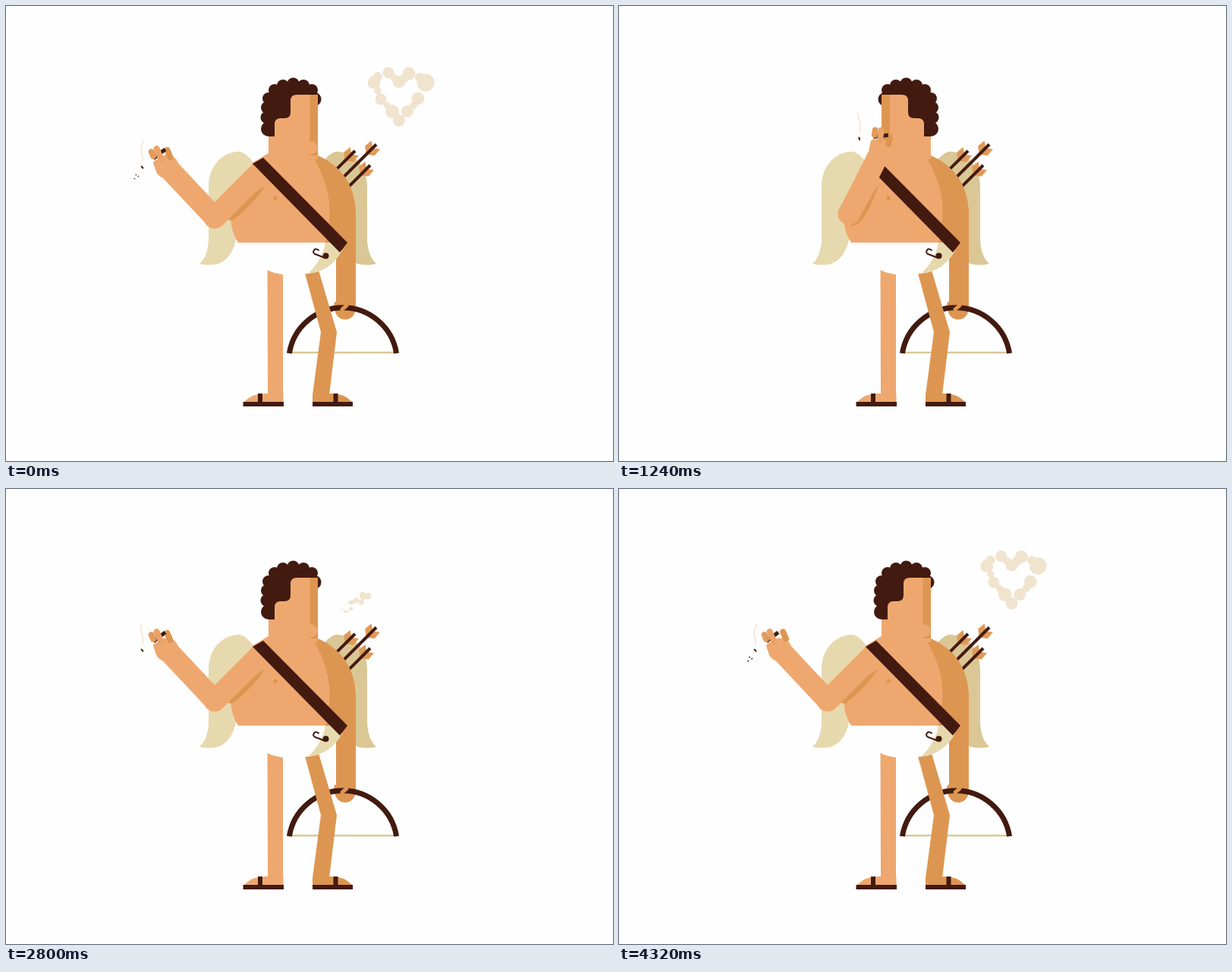
An HTML page with a canvas for the animation above (4360 ms loop, 800 by 600 pixels).

```html
<!DOCTYPE html>
<html lang="en">
<head>
<meta charset="utf-8">
<title>Cupid on a break</title>
<style>
html, body { margin: 0; width: 100%; height: 100%; overflow: hidden; background: #fefefe; }
canvas { display: block; }
</style>
</head>
<body>
<canvas id="stage" width="800" height="600"></canvas>
<script>
const c = document.getElementById('stage').getContext('2d');
const LOOP = 4360;
const SKIN = '#eea86f', SHADE = '#dd9651', DARK = '#431a10', WHITE = '#fefefe';
const WING = '#e7d9ae', WING_DARK = '#dac795', SMOKE = '#f0e4cf';

const clamp = v => Math.max(0, Math.min(1, v));
const lerp = (a, b, k) => a + (b - a) * k;
const span = (t, a, b) => clamp((t - a) / (b - a));
const smooth = k => k * k * (3 - 2 * k);
const easeIn = k => k * k;
const easeOut = k => 1 - (1 - k) * (1 - k);

function fill(d, color) {
  c.fillStyle = color;
  c.fill(new Path2D(d));
}
function line(d, color, width, cap = 'butt') {
  c.strokeStyle = color;
  c.lineWidth = width;
  c.lineCap = c.lineJoin = cap === 'round' ? 'round' : 'miter';
  if (cap !== 'round') c.lineCap = 'butt';
  c.stroke(new Path2D(d));
}
function dot(x, y, r, color) {
  if (r <= 0) return;
  c.fillStyle = color;
  c.beginPath();
  c.arc(x, y, r, 0, 7);
  c.fill();
}
function group(x, y, draw) {
  c.save();
  c.translate(x, y);
  draw();
  c.restore();
}

// Arm poses: elbow x, elbow y, forearm angle, forearm length, wrist turn
const OUT = [275, 279, -133.2, 92, -23];
const UP = [291, 277, -90.7, 87, 0];
const MOUTH = [303, 274, -63.2, 93, 8];
const BACK = [294, 275, -78.2, 88, 0];
const armKeys = [
  [40, 280, OUT, UP, easeIn],
  [280, 520, UP, MOUTH, easeOut],
  [1800, 2260, MOUTH, BACK, smooth],
  [2260, 2700, BACK, OUT, smooth]
];
function armPose(t) {
  let pose = OUT;
  for (const [a, b, from, to, ease] of armKeys)
    if (t >= a) pose = from.map((v, i) => lerp(v, to[i], ease(span(t, a, b))));
  const [ex, ey, deg, len, turn] = pose, a = deg * Math.PI / 180;
  return { ex, ey, hx: ex + len * Math.cos(a), hy: ey + len * Math.sin(a), turn: turn * Math.PI / 180 };
}

// 1 faces right, 0 front, -1 left
const headTurn = t => 1 - 2 * smooth(span(t, 40, 380)) + 2 * smooth(span(t, 2040, 2520));
const sag = t => easeOut(span(t, 40, 320)) - smooth(span(t, 560, 1080));

function wings() {
  const d = 'M308 192C284 192 267 212 267 238V308Q266 330 255 340Q294 349 303 308L330 300V212Q318 194 308 192Z';
  fill(d, WING);
  c.save();
  c.translate(743, 0);
  c.scale(-1, 1);
  fill(d, WING_DARK);
  c.restore();
}

function arrow(x, y, len) {
  group(x, y, () => {
    c.rotate(-Math.PI / 4);
    for (const s of [1, -1]) fill(`M-18 ${s}L-12 ${9 * s}L-1 ${8 * s}L-6 ${s}Z`, '#e09a58');
    line(`M0 0H${-len}`, DARK, 4);
  });
}

function body(b) {
  fill(`M403 196L411 197Q458 218 461 270V${400 + 4.5 * b}H435V325L415 ${312 + b}Z`, SHADE);
  fill(`M346 194L326 206Q297 245 296 279Q297 299 306 ${312 + b}H421Q425 300 426 280Q430 240 403 196Z`, SKIN);
  dot(355, 253.5 + b, 2.8, SHADE);
}

function bow() {
  dot(447, 400, 13.5, SHADE);
  dot(437, 394, 5, SHADE);
  line('M377 457H512', WING_DARK, 2.5);
  line('M373.4 458A71.5 71.5 0 0 1 514.6 458', DARK, 7);
  line('M449 395L443 400', SHADE, 5, 'round');
}

function legs(b) {
  const kx = 2.5 * b, ky = 430 - 2 * b;
  fill(`M392 345H411L${436 + kx} ${ky}L426 513H404L${415 + kx} ${ky}Z`, SHADE);
  fill('M344.5 340H365V514H345Z', SKIN);
  fill('M314 522Q324 511 341 511H365.5V522Z', SKIN);
  fill('M456 522Q446 511 429 511H404V522Z', SHADE);
  c.fillStyle = DARK;
  c.fillRect(312.5, 522, 53.5, 6);
  c.fillRect(404, 522, 53, 6);
  c.fillRect(332, 511, 6, 12);
  c.fillRect(431.5, 511, 6, 12);
}

function diaper() {
  const hem = 'Q428 350 443 322L437 312';
  fill(`M303 312Q315 342 344 348Q356 354 370 354L398 353${hem}Z`, WHITE);
  fill(`M421 312Q417 335 398 353${hem}Z`, WING);
  line('M412 322Q407 318 405 324Q405 326 407 327L420 332', DARK, 2, 'round');
  dot(421.5, 329.5, 4, DARK);
}

const curls = [[346, 162, 10], [343.5, 147, 8], [344, 134, 8], [346, 122, 8], [354, 111, 8], [365, 105, 8]];
function hair(h) {
  const side = s => curls.map(([x, y, r]) => {
    const u = Math.max(0, s * h) ** 2;
    if (y > 115) x += 6 * u;
    if (y > 123) y = lerp(y, 123, u);
    return [s < 0 ? x : 757 - x, y, r];
  });
  const left = side(-1), right = side(1);
  const all = [...left, [378.5, 102.5, 8], ...right.reverse()];
  all.forEach(p => dot(...p, DARK));
  fill('M' + all.map(p => p[0] + ' ' + p[1]).join('L') + 'Z', DARK);
  c.fillRect(346, 118, 65, 54);
}

function head(h) {
  const l = 354 + (h > 0 ? 21 : 16) * h, r = 403 + (h > 0 ? 16 : 22) * h;
  hair(h);
  c.save();
  c.beginPath();
  c.rect(346, 110, 65, 92);
  c.clip();
  const face = new Path2D(`M346 202V172H${l - 21}V156q0-8 8-8H${l - 8}q8 0 8-8V125q0-8 8-8` +
    `H${r - 8}q8 0 8 8V140q0 8 8 8H${r + 13}q8 0 8 8V172H411V202Z`);
  c.clip(face);
  c.fillStyle = SKIN;
  c.fillRect(300, 100, 150, 110);
  c.fillStyle = SHADE;
  if (h > -.1) c.fillRect(400.5, 110, 11, 87);
  else c.fillRect(346, 110, 11, 74);
  dot(380 + 22 * Math.max(-1, Math.min(1, h * 1.6)), 187, 8.5, SKIN);
  c.restore();
}

function upperArm({ ex, ey }) {
  const k = (ex - 275) / 28;
  fill(`M342 237Q323 ${265 + 26 * k} ${298 + 8 * k} ${283 + 7 * clamp(k * 1.6)}L${ex} ${ey}Z`, SHADE);
  line(`M332 222L${ex} ${ey}`, SKIN, 29, 'round');
}

function hand(t) {
  fill('M-15 4V-9Q-15 -14 -10 -14H2V10Z', SKIN);
  dot(0, 0, 15.5, SKIN);
  const flick = span(t, 4200, 4300) * 4;
  line(`M${9 + flick} -20V-10`, SHADE, 8, 'round');
  line('M-12 -18L-30 -12', WHITE, 3);
  line('M-12 -17L7 -22', DARK, 5);
  line('M-31 -14L-29.5 -10', DARK, 2);
  line('M-11 -26V-20', '#e29b5b', 8, 'round');
  line('M-3 -27V-12', '#e9a267', 8, 'round');
}

function wisp(x, y, t) {
  let d = '';
  for (let i = 8; i <= 34; i += 2)
    d += (d ? 'L' : 'M') + (x + Math.sin(i * .2 - t * Math.PI * 16 / LOOP) * i / 14) + ' ' + (y - i);
  line(d, '#efe4d2', 1.5, 'round');
}

// Fully grown smoke heart: x, y, radius, in the order the puffs leave the mouth
const puffs = [
  [553, 101, 11.5], [531, 89, 8.5], [545, 94, 6], [543, 122, 8.5], [518, 100, 8],
  [525, 95, 6], [512, 95, 5], [504, 88, 7.5], [529, 139, 8], [537, 131, 5],
  [518, 151, 8], [509, 139, 9], [490, 93, 6], [494, 123, 7.5], [485, 101, 8.5],
  [490, 112, 4.5], [502, 131, 4.5]
];
function smoke(t) {
  const late = t < 1200, now = late ? t + LOOP : t;
  if (!late && t < 2520) return;
  const p = (now - 3480) / 880, grown = clamp(p);
  puffs.forEach(([x, y, size], i) => {
    const tx = lerp(508 + (x - 518) * .8, x, p), ty = lerp(150 + (y - 151) * .8, y, p);
    const e = 1 - (1 - span(now, 2520 + i * 11, 3120 + i * 11)) ** 1.5, q = 1 - e;
    const r = lerp(7.5, size, grown) * clamp(e * 1.6 - .4) - Math.max(0, now - LOOP) / 95;
    dot(q * q * 412 + 2 * q * e * 462 + e * e * tx, q * q * 188 + 2 * q * e * 145 + e * e * ty, r, SMOKE);
  });
}

function ash(t) {
  const age = (t + LOOP - 4280) % LOOP;
  if (age > 400) return;
  for (const [x, y] of [[173, 221], [171, 226], [176, 223]])
    dot(x - age * .02, y + age * .02, 1.1 * (1 - age / 500), '#443b38');
}

function render(t) {
  const b = sag(t), arm = armPose(t);
  c.fillStyle = WHITE;
  c.fillRect(0, 0, 800, 600);
  smoke(t);
  group(0, 3.3 * b, wings);
  arrow(460, 191, 36);
  arrow(488, 182.5, 66);
  arrow(480, 210, 42);
  body(b);
  group(0, 4.5 * b, bow);
  legs(b);
  group(0, b, diaper);
  upperArm(arm);
  group(0, 1.3 * b, () => head(headTurn(t)));
  fill('M325 208L339 200L450 312L440 325Z', DARK);
  line(`M${arm.ex} ${arm.ey}L${arm.hx} ${arm.hy}`, SKIN, 28, 'round');
  group(arm.hx, arm.hy, () => {
    c.rotate(arm.turn);
    hand(t);
  });
  const cos = Math.cos(arm.turn), sin = Math.sin(arm.turn);
  wisp(arm.hx - 30 * cos + 12 * sin, arm.hy - 30 * sin - 12 * cos, t);
  ash(t);
}

function tick() {
  const t = performance.now() % LOOP;
  render(Math.floor(t / 40) * 40);
  requestAnimationFrame(tick);
}
tick();
</script>
</body>
</html>
```
